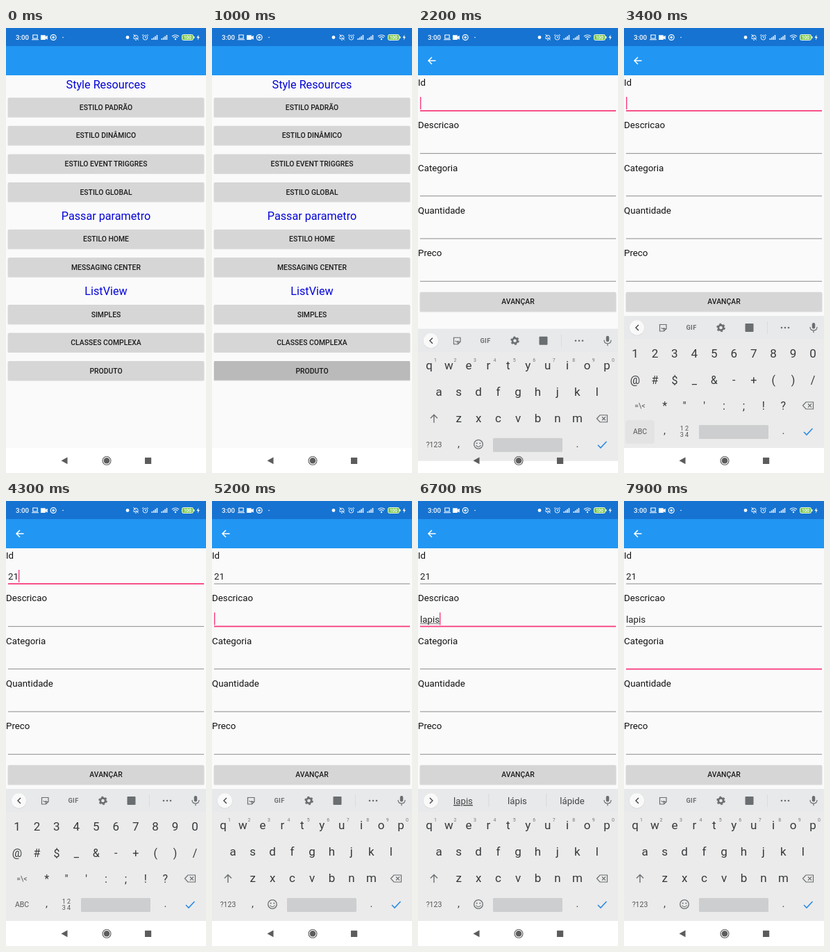
These frames come from a looping animation (288x640 px, 8 s). An HTML page:

```html
<!DOCTYPE html>
<html lang="pt">
<head>
<meta charset="utf-8">
<style>
html, body { margin: 0; width: 100%; height: 100%; overflow: hidden; background: #fafafa; }
svg { display: block; width: 288px; height: 640px; font-family: Roboto, "Noto Sans", sans-serif; }
</style>
</head>
<body>
<svg id="stage" viewBox="0 0 288 640"></svg>
<script>
const LOOP = 8000;
const PINK = '#f83d7f';
const GREY = '#6b6e71';
const stage = document.getElementById('stage');

// Markup helpers
const esc = s => s.replace(/&/g, '&amp;').replace(/</g, '&lt;');
const text = (s, x, y, size, fill, more = '') =>
  `<text x="${x}" y="${y}" font-size="${size}" fill="${fill}" ${more}>${esc(s)}</text>`;
const mid = (s, x, y, size, fill, more = '') => text(s, x, y, size, fill, 'text-anchor="middle" ' + more);
const rect = (x, y, w, h, fill, more = '') =>
  `<rect x="${x}" y="${y}" width="${w}" height="${h}" fill="${fill}" ${more}/>`;
const circle = (x, y, r, fill, more = '') => `<circle cx="${x}" cy="${y}" r="${r}" fill="${fill}" ${more}/>`;
const line = (d, color, width = 1.2, more = '') =>
  `<path d="${d}" fill="none" stroke="${color}" stroke-width="${width}" ${more}/>`;
const shape = (d, fill) => `<path d="${d}" fill="${fill}"/>`;
const group = (id, body, more = '') => `<g id="${id}" ${more}>${body}</g>`;
const button = (label, y) =>
  rect(2.5, y - 13.2, 283, 28, '#000', 'rx="1.5" opacity=".13"') +
  rect(3, y - 13.8, 282, 27.4, '#d6d6d6', 'rx="1.5"') +
  mid(label, 144, y + 3.8, 10.4, '#1c1c1c', 'font-weight="500"');

// Home page
const titles = [['Style Resources', 86.5], ['Passar parametro', 276], ['ListView', 384]];
const buttons = [
  ['ESTILO PADRÃO', 114], ['ESTILO DINÂMICO', 154.5], ['ESTILO EVENT TRIGGRES', 195.2],
  ['ESTILO GLOBAL', 235.8], ['ESTILO HOME', 303.5], ['MESSAGING CENTER', 344],
  ['SIMPLES', 411.8], ['CLASSES COMPLEXA', 452.3], ['PRODUTO', 492.8]
];
const home = titles.map(([s, y]) => mid(s, 144, y, 16.2, '#0505d8')).join('') +
  buttons.map(([s, y]) => button(s, y)).join('') +
  `<g clip-path="url(#tapClip)">${circle(144, 493, 1, '#000', 'id="tap" opacity="0"')}</g>`;

// Form page
const PITCH = 61.3;
const labels = ['Id', 'Descricao', 'Categoria', 'Quantidade', 'Preco'];
const form = rect(0, 0, 288, 640, '#fafafa') + labels.map((s, i) => {
  const y = i * PITCH;
  return text(s, 0, 83 + y, 13.3, '#111') +
    rect(3, 118.6 + y, 282, 0.9, '#808080', `id="rule${i}"`) +
    text('', 3, 113.3 + y, 13.3, '#222', `id="value${i}"`);
}).join('') + button('AVANÇAR', 393.6) +
  rect(3, 176, 0, 0.7, '#444', 'id="compose"') +
  rect(3, 99, 1.4, 18, PINK, 'id="caret"');

// Keyboard
const colX = i => 16 + 28.45 * i;
const midX = i => 30.2 + 28.45 * i;
const keyRow = (keys, x, y, size = 17) =>
  [...keys].map((k, i) => mid(k, x(i), y, size, '#37393b')).join('');
const letters = keyRow('qwertyuiop', colX, 472) + keyRow('asdfghjkl', midX, 510) +
  keyRow('zxcvbnm', i => midX(i + 1), 548) +
  [...'1234567890'].map((d, i) => mid(d, colX(i) + 9, 461, 7, '#777')).join('') +
  line('M23 549V537.5M18 542.5l5-5 5 5', GREY, 1.4) +
  mid('?123', 23, 584, 10.5, '#555') +
  circle(87, 580, 6.3, 'none', `stroke="${GREY}" stroke-width="1.3"`) +
  circle(84.7, 578.5, 1, GREY) + circle(89.3, 578.5, 1, GREY) + line('M83.5 581.5q3.5 4.5 7 0', GREY);
const symbols = keyRow('1234567890', colX, 473.5) + keyRow('@#$_&-+()/', colX, 511.5, 16) +
  keyRow('*"\':;!?', i => midX(i + 1), 549, 16) +
  mid('=\\<', 23, 547, 10.5, '#555') + mid('ABC', 23, 584, 10.5, '#555') +
  mid('1 2', 87, 579, 9, '#555') + mid('3 4', 87, 588, 9, '#555');
const gear = circle(139.5, 431, 3.6, 'none', `stroke="${GREY}" stroke-width="2.6"`) +
  circle(139.5, 431, 5.4, 'none', `stroke="${GREY}" stroke-width="1.8" stroke-dasharray="2.8 2.85"`);
const tools = line('M21 427l-4 4 4 4', '#444', 1.4) +
  line('M51.5 426.5h9.5v6l-3.5 3.5h-6zM61 432.5h-3.5v3.5M53.8 431q2 3.5 4.2 0', GREY) +
  mid('GIF', 97, 434.3, 9.2, GREY, 'font-weight="700" letter-spacing=".4"') + gear +
  rect(174.5, 425, 12, 12, GREY, 'rx="1"') + rect(206, 422, 0.7, 18, '#d5d7d8') +
  [227, 232, 237].map(x => circle(x, 431, 1.3, GREY)).join('');
const hints = line('M17 427l4 4-4 4', '#444', 1.4) +
  rect(101.5, 421, 0.7, 19, '#d2d4d5') + rect(184.5, 421, 0.7, 19, '#d2d4d5') +
  [65, 143, 222].map((x, i) => mid('', x, 436, 13.2, '#444',
    `id="hint${i}" ${i ? '' : 'text-decoration="underline"'}`)).join('');
const keyboard = rect(0, 414, 288, 190, '#ebebeb') + rect(0, 414, 288, 33, '#e7e9ea') +
  circle(18.5, 431.4, 11, '#000', 'opacity=".08"') + circle(18.5, 431, 10.7, '#f9f9f9') +
  group('tools', tools) + group('hints', hints) +
  rect(270.8, 424, 4.4, 8.5, GREY, 'rx="2.2"') + line('M268 430q0 5 5 5t5-5M273 435v3.2', GREY) +
  rect(2, 564, 42, 34, '#000', 'id="modePress" rx="4" opacity="0"') +
  circle(265, 580.5, 16, '#000', 'id="enterPress" opacity="0"') +
  group('letters', letters) + group('symbols', symbols) +
  line('M257.5 543l4.5-5h10.5v10H262zM265 540.5l5 5M270 540.5l-5 5', GREY) +
  mid(',', 58.5, 584, 15, '#444') + rect(108, 571, 100, 20, '#cdcecf', 'rx="1.5"') +
  mid('.', 229.5, 584, 15, '#444') + line('M259 581l4 4 8.5-9', '#2a8be4', 1.6) +
  group('popup', rect(-14.5, -67.5, 29, 86.5, '#000', 'rx="3" opacity=".13"') +
    rect(-14, -68, 28, 85, '#fff', 'rx="3"') + mid('', 0, -38, 21, '#333', 'id="popupKey"') +
    mid('...', 7.5, -31, 8, '#555'));

// System bars
const signal = x => shape(`M${x} 17v-2h1.6v2zM${x + 2.4} 17v-3.5H${x + 4}V17zM${x + 4.8} 17v-5.2h1.6V17zM${x + 7.2} 17V10h1.6v7z`, '#e6f0fb');
const bars = rect(0, 0, 288, 26, '#1673d1') + rect(0, 26, 288, 42, '#2196f3') +
  text('3:00', 14, 17, 9.7, '#fff', 'font-weight="500"') +
  line('M38.8 10h6.4v5h-6.4zM37 16.8h10', '#fff', 1.1) +
  shape('M50 10.3h6.8v2.2l3-1.8v6l-3-1.8v2.1H50z', '#fff') +
  circle(68.2, 13.5, 3.9, 'none', 'stroke="#fff" stroke-width="1.2"') + circle(68.2, 13.5, 1.7, '#fff') +
  circle(82, 13.5, 0.8, '#fff') + circle(175, 13.5, 2.4, '#fff') +
  line('M184 15.5v-2.2q0-3 3-3t3 3v2.2zM183.5 9l7 8.5M186 17.3h2', '#e6f0fb', 1) +
  circle(200.5, 13.8, 3.3, 'none', 'stroke="#e6f0fb"') +
  line('M200.5 12v2h1.5M196 11l2-1.8M205 11l-2-1.8', '#e6f0fb', 1) +
  signal(209.5) + signal(223.5) +
  line('M239 12q5-4 10 0M240.8 14q3.2-2.6 6.4 0', '#e6f0fb', 1.2) + circle(244, 16, 1.2, '#e6f0fb') +
  rect(253.5, 9.5, 16, 8, '#78c850', 'rx="2" stroke="#eef7e8"') + rect(270, 12, 1.5, 3, '#eef7e8') +
  mid('100', 261.5, 16, 6.5, '#fff', 'font-weight="700"') +
  shape('M277.5 9.5l-3 4.5h2l-.6 3.5 3-4.7h-2z', '#fff') +
  group('back', line('M25.5 47H15.5M20 42l-5 5 5 5', '#fff', 1.5));
const nav = rect(0, 604, 288, 36, '#fff');
const navIcons = shape('M79.5 622.3l9-5v10z', '#5c5c5c') +
  circle(145, 622.3, 6, 'none', 'stroke="#5c5c5c" stroke-width="1.1"') + circle(145, 622.3, 4.3, '#5c5c5c') +
  rect(200, 617.8, 9.2, 9.2, '#5c5c5c');

stage.innerHTML = `<defs>
  <clipPath id="pageClip">${rect(0, 68, 288, 572, '#000')}</clipPath>
  <clipPath id="tapClip">${rect(3, 479, 282, 27.4, '#000')}</clipPath></defs>` +
  rect(0, 0, 288, 640, '#fafafa') +
  `<g clip-path="url(#pageClip)">${group('home', home)}${group('form', form)}</g>` +
  bars + nav + group('keyboard', keyboard) + navIcons;

const ui = {};
stage.querySelectorAll('[id]').forEach(n => ui[n.id] = n);
const set = (id, attrs) => { for (const k in attrs) ui[id].setAttribute(k, attrs[k]); };
const show = (id, on) => set(id, { display: on ? 'inline' : 'none' });
const write = (id, s) => { if (ui[id].textContent !== s) ui[id].textContent = s; };

// Script of the interaction
const clamp = v => Math.min(1, Math.max(0, v));
const span = (t, start, length) => clamp((t - start) / length);
const OPEN = 1050, SYMBOLS = 3200;
const focusTimes = [1950, 4750, 7290];
// key, field, press, release, key centre x and y
const presses = [
  ['2', 0, 3720, 3820, colX(1), 466], ['1', 0, 4060, 4160, colX(0), 466],
  ['l', 1, 5830, 5930, midX(8), 504], ['a', 1, 6060, 6160, midX(0), 504],
  ['p', 1, 6230, 6310, colX(9), 466], ['i', 1, 6370, 6450, colX(7), 466],
  ['s', 1, 6500, 6590, midX(1), 504]
];
const suggestions = {
  l: ['l', 'o', 'liga'], la: ['la', 'lá', 'lado'], lap: ['lap', 'lápis', 'lapso'],
  lapi: ['lapi', 'lápis', 'lapis'], lapis: ['lapis', 'lápis', 'lápide']
};
const zoom = s => `translate(144 336) scale(${s}) translate(-144 -336)`;
const fadePress = (t, start, hold) => t < start ? 0 : 0.1 * (1 - span(t, start + hold, 300));

function render(t) {
  // Page change
  const p = 1 - (1 - span(t, OPEN, 350)) ** 3;
  const ripple = span(t, 650, 350);
  set('tap', { r: 10 + 140 * ripple, opacity: t < 650 ? 0 : 0.13 });
  show('home', t < OPEN + 350);
  set('home', { transform: zoom(1 + 0.15 * p) });
  set('form', { transform: zoom(0.85 + 0.15 * p), opacity: span(t, OPEN, 160) });
  show('back', t >= OPEN);

  // Fields and caret
  const focus = focusTimes.filter(f => t >= f).length - 1;
  const done = presses.filter(k => t >= k[3]);
  const values = labels.map((_, i) => done.filter(k => k[1] === i).map(k => k[0]).join(''));
  values.forEach((v, i) => {
    const on = i === focus;
    write('value' + i, v);
    set('rule' + i, { y: (on ? 118.2 : 118.6) + i * PITCH, height: on ? 1.8 : 0.9, fill: on ? PINK : '#808080' });
  });
  const width = focus >= 0 && values[focus] ? ui['value' + focus].getComputedTextLength() : 0;
  const lastEdit = Math.max(focusTimes[focus] || 0, ...done.map(k => k[3]));
  show('caret', focus >= 0 && Math.floor((t - lastEdit) / 500) % 2 === 0);
  set('caret', { x: 3 + width, y: 99 + Math.max(0, focus) * PITCH });
  set('compose', { width: focus === 1 ? width : 0 });

  // Keyboard
  const slide = (1 - span(t, 2110, 207)) ** 4;
  show('keyboard', t >= 2110);
  set('keyboard', { transform: `translate(0 ${190 * slide})` });
  const numeric = t >= SYMBOLS && t < focusTimes[1];
  show('symbols', numeric);
  show('letters', !numeric);
  const words = focus === 1 && suggestions[values[1]];
  show('hints', !!words);
  show('tools', !words);
  if (words) words.forEach((w, i) => write('hint' + i, w));
  set('modePress', { opacity: fadePress(t, 3110, 100) });
  set('enterPress', { opacity: fadePress(t, t < 6000 ? 4620 : 7190, 100) });
  const held = presses.find(k => t >= k[2] && t < k[3]);
  show('popup', !!held);
  if (held) {
    write('popupKey', held[0]);
    set('popup', { transform: `translate(${held[4]} ${held[5]})` });
  }
}

const begin = performance.now();
function tick() {
  render((performance.now() - begin) % LOOP);
  requestAnimationFrame(tick);
}
render(0);
requestAnimationFrame(tick);
</script>
</body>
</html>
```
